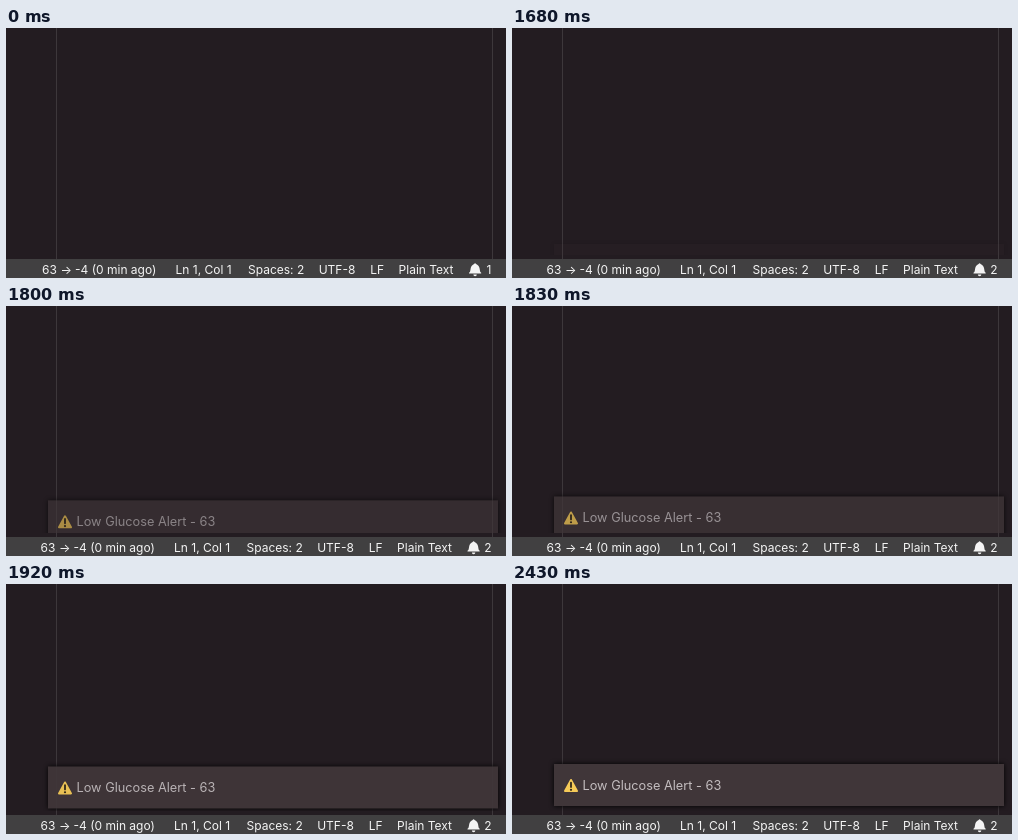
An HTML page that plays this animation: 500x250 px, repeating every 3.33 s.

```html
<!DOCTYPE html>
<html lang="en">
<head>
<meta charset="utf-8">
<title>Low glucose alert</title>
<style>
  html, body { margin: 0; width: 100%; height: 100%; overflow: hidden; background: #231c21; }
  svg { display: block; width: 500px; height: 250px; }
  text { font: 12px Inter, Roboto, sans-serif; fill: #f4f4f4; white-space: pre; }
  #toast text { font-size: 12.75px; fill: #c3bdbf; }
  #toast .box { fill: #403639; filter: drop-shadow(0 0 2.5px #000); }
</style>
</head>
<body>
<svg viewBox="0 0 500 250">
  <clipPath id="area"><path d="M0 0H500V227H0z"/></clipPath>
  <path d="M50.5 0V231M486.5 0V231" stroke="#3d373b"/>

  <g clip-path="url(#area)">
    <g id="toast">
      <rect class="box" x="42" y="180" width="450" height="42"/>
      <path d="M59 196 L65 207 H53 Z" fill="#f6cb58" stroke="#f6cb58" stroke-width="2" stroke-linejoin="round"/>
      <path d="M59 198.7V203" stroke="#302719" stroke-width="1.8" stroke-linecap="round"/>
      <circle cx="59" cy="205.8" r="1.1" fill="#302719"/>
      <text x="70.5" y="206">Low Glucose Alert - 63</text>
    </g>
  </g>

  <rect y="231" width="500" height="19" fill="#414041"/>
  <g id="status">
    <text x="36" y="246">63<tspan x="54.5">→</tspan><tspan x="69">-4 (0 min ago)</tspan></text>
    <text x="169.5" y="246">Ln 1, Col 1</text>
    <text x="242" y="246">Spaces: 2</text>
    <text x="312.7" y="246">UTF-8</text>
    <text x="364.3" y="246">LF</text>
    <text x="392.6" y="246">Plain Text</text>
    <path transform="translate(463 234.3) scale(.87)" fill="#f4f4f4"
      d="M14 12v1H0v-1l.7-.6C1.5 10.600 1.500 8.900 1.900 7 2.700 3.200 6 2 6 2a1 1 0 0 1 2 0s3.400 1.200 4.200 5c.4 1.900.4 3.700 1.200 4.400zM7 16a2 2 0 0 0 2-2H5a2 2 0 0 0 2 2z"/>
  </g>
  <text id="count" x="485.5" y="246" text-anchor="end">1</text>
</svg>
<script>
  const LOOP = 3330, START = 1680, STEP = 30, SLIDE = 325, RISE = 36;
  const $ = id => document.getElementById(id);
  const toast = $('toast'), status = $('status'), count = $('count');
  const begin = performance.now();

  function draw(now) {
    const time = Math.max(0, now - begin) % LOOP;
    const shown = time >= START;
    const age = Math.floor((time - START) / STEP) * STEP;
    // The toast rises with a quadratic ease-out and fades in as it does.
    const left = Math.max(0, 1 - age / SLIDE);
    const offset = age >= 300 ? 0 : RISE * left * left;

    toast.setAttribute('transform', `translate(0 ${offset})`);
    toast.setAttribute('opacity', shown ? 1 - offset / 40 : 0);
    status.setAttribute('transform', `translate(${shown ? -1.5 : 0} 0)`);
    count.textContent = shown ? 2 : 1;
    requestAnimationFrame(draw);
  }
  draw(begin);
</script>
</body>
</html>
```
